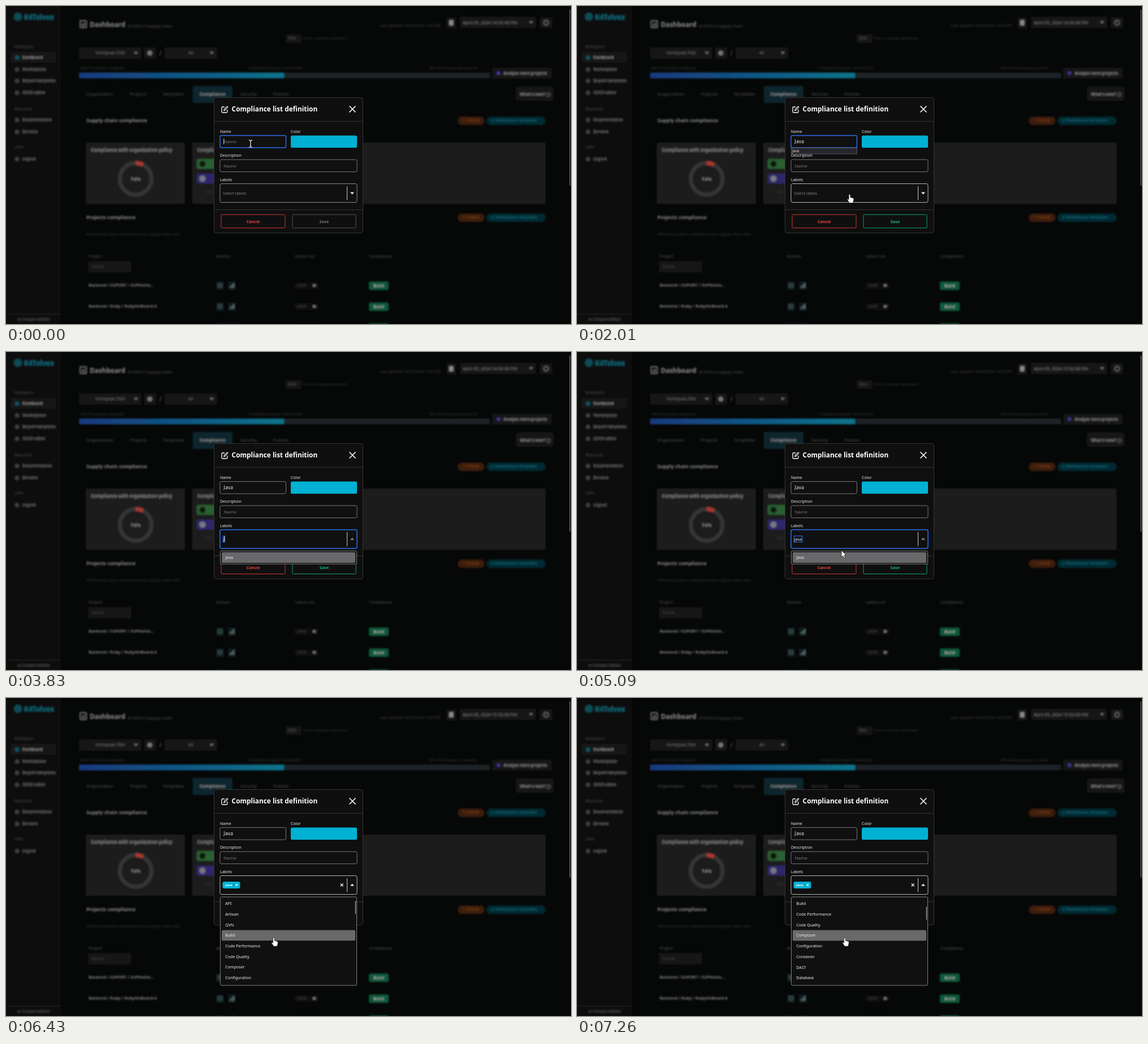
Recreate the animation shown at these times as an HTML page. Size 998 by 561 pixels, loop 8000 ms.

```html
<!DOCTYPE html>
<html lang="en">
<head>
<meta charset="utf-8">
<title>Compliance list definition</title>
<style>
  html, body { margin: 0; width: 100%; height: 100%; overflow: hidden; background: #060707; }
  svg { display: block; width: 100vw; height: 100vh; }
  text { font-family: "Noto Sans", sans-serif; white-space: pre; }
</style>
</head>
<body>
<svg id="stage" viewBox="0 0 998 561"></svg>
<script>
const LOOP = 8000, ROW = 18.7, BLUE = '#2f6fea', GREY = '#77777a';
const stage = document.getElementById('stage');

// ---- markup helpers ----
const box = (x, y, w, h, fill, r = 0, extra = '') =>
  `<rect x="${x}" y="${y}" width="${w}" height="${h}" rx="${r}" fill="${fill}" ${extra}/>`;
const frame = (x, y, w, h, stroke, r = 2.5, extra = '') =>
  box(x, y, w, h, 'none', r, `stroke="${stroke}" ${extra}`);
const label = (x, mid, str, size, fill, weight = 400, extra = '') =>
  `<text x="${x}" y="${(mid + size * 0.36).toFixed(2)}" font-size="${size}" fill="${fill}" font-weight="${weight}" ${extra}>${str}</text>`;
const center = 'text-anchor="middle"';
const line = (d, stroke, w = 1, extra = '') =>
  `<path d="${d}" fill="none" stroke="${stroke}" stroke-width="${w}" ${extra}/>`;

// ---- blurred page behind the dialog ----
function sidebar() {
  const item = (y, str, on) =>
    box(16, y - 3.5, 7, 7, on ? '#0a5360' : '#3c3c3c', 2) + label(29, y, str, 6.6, on ? '#8a8a8a' : '#6c6c6c', 600);
  const head = (y, str) => label(15, y, str, 6.5, '#474747');
  return box(0, 0, 97, 561, '#0a0a0a') +
    '<circle cx="21" cy="19" r="7" fill="#0b4b57"/>' +
    label(32, 20, 'K4Tolvex', 12, '#0a6c7e', 700) +
    head(72, 'Workspace') + box(8, 81, 80, 19, '#191919', 2) + item(91, 'Dashboard', true) +
    item(112, 'Marketplace') + item(132, 'Import templates') + item(153, 'CI/CD editor') +
    head(182, 'Resources') + item(201, 'Documentation') + item(222, 'Zorvane') +
    head(249, 'Links') + item(270, 'Logout') +
    box(0, 543, 97, 1, '#222') + label(20, 553, '≪ Collapse sidebar', 6.4, '#666');
}

function header() {
  const select = (x, y, w, str) => box(x, y, w, 20, '#181818', 3) +
    label(x + w / 2, y + 10, str, 6.8, '#707070', 500, center) +
    `<path d="M${x + w - 13} ${y + 8}h7l-3.5 4z" fill="#707070"/>`;
  const tabs = [[142, 'Organization'], [219, 'Projects'], [277, 'Templates'], [414, 'Security'], [472, 'Policies']];
  return frame(131, 26, 11, 12, '#777', 1, 'stroke-width="2"') + box(134, 31, 2, 5, '#777') + box(137, 29, 2, 7, '#777') +
    label(148, 33, 'Dashboard', 11.6, '#929292', 700) + label(215, 35, 'of K4TLX Supply chain', 7.6, '#505050') +
    label(660, 35, 'Last updated: 04/05/2024 14:50 PM', 6.5, '#3c3c3c') +
    box(778, 20, 17, 20, '#181818', 3) + box(783, 25, 7, 9, '#8a8a8a', 1) +
    box(802, 19, 134, 20, '#181818', 3) +
    '<text id="date" x="807" y="32" font-size="7.7" fill="#7c7c7c"></text><path d="M924 27h7l-3.5 4z" fill="#707070"/>' +
    box(943, 20, 22, 19, '#181818', 3) + '<circle cx="954" cy="29.500" r="4" fill="none" stroke="#777" stroke-width="1.500"/>' +
    box(494, 50, 28, 15, '#151515', 3) + label(499, 57, 'Beta', 6.2, '#555') + label(525, 57, 'This is a preview dashboard', 6, '#3d3d3d') +
    select(129, 73, 110, 'Northpeak-7000') + box(244, 73, 21, 20, '#181818', 3) +
    '<circle cx="254" cy="83" r="4" fill="#777"/>' + label(271, 83, '/', 10, '#777') + select(280, 73, 93, 'All') +
    label(131, 110, '300/716 projects analyzed', 6.4, '#343434') + label(427, 110, 'Completed analysis: 03/04/2024', 6.4, '#343434') +
    label(747, 110, '50% of all resources covered', 6.4, '#343434') +
    box(129, 117.5, 726, 10, '#1a2127', 2) + box(129, 117.5, 362, 10, 'url(#bar)', 2) +
    box(859, 109, 105, 19, '#191919', 3) + '<circle cx="870" cy="118.500" r="3" fill="#45369a"/>' +
    label(879, 118.5, 'Analyze more projects', 6.9, '#868686', 600) +
    tabs.map(([x, s]) => label(x, 155, s, 7.8, '#555')).join('') +
    box(330, 141, 70, 30, '#0a262d', 2) + label(342, 155, 'Compliance', 7.8, '#909090', 700) +
    box(902, 143, 64, 23, '#151515', 3) + frame(902, 143, 64, 23, '#242424', 3) + label(908, 155, "What's new? ⓘ", 7.1, '#8a8a8a', 600);
}

function section(y, str) {
  return label(142, y, str, 8.7, '#8c8c8c', 700) +
    box(798, y - 7, 47, 15, '#3a1c09', 7) + label(806, y, '⚐ Critical', 6.8, '#9a4d1c') +
    box(849, y - 7, 104, 15, '#062a32', 7) + label(856, y, '◎ Marketplace templates', 6.9, '#0b7487');
}

function cards() {
  return box(141, 241, 175, 108, '#1b1b1b', 2) + label(150, 254, 'Compliance with organization policy', 7.9, '#858585', 600) +
    '<circle cx="229" cy="305" r="28" fill="none" stroke="#343434" stroke-width="7"/>' +
    line('M229 277A28 28 0 0 1 242 280.200', '#a5382f', 7) + label(229, 305, '7.6%', 7.2, '#999', 600, center) +
    box(329, 241, 624, 108, '#1b1b1b', 2) + label(338, 254, 'Compliance lists', 7.9, '#858585', 600) +
    box(337, 270, 60, 17, '#2a6030', 3) + '<circle cx="347" cy="278.500" r="5.500" fill="#0b140c"/>' +
    box(337, 296, 60, 17, '#2d276c', 3) + '<circle cx="347" cy="304.500" r="5.500" fill="#77777f"/>' +
    label(347, 328, '+ Add', 6.5, '#333');
}

function tableRow(y, name) {
  return label(146, y - 1, name, 7.3, '#858585', 600) +
    box(371, y - 7, 14, 15, '#0d1c1f', 2) + frame(375, y - 3, 6, 6, '#66777a', 1) +
    box(392, y - 7, 14, 15, '#0d1c1f', 2) + line(`M396 ${y + 4}v-2M399 ${y + 4}v-5M402 ${y + 4}v-8`, '#66777a', 1.8) +
    box(508, y - 6, 45, 13, '#101010', 6) + label(513, y, 'Latest', 6.3, '#444') + box(542, y - 2, 5, 4, '#777', 1) +
    box(641, y - 7, 35, 15, '#08583b', 3) + label(658.5, y, 'Build', 7.2, '#a3aaa7', 700, center);
}

function table() {
  const heads = [[146, 'Project'], [371, 'Actions'], [510, 'Latest run'], [642, 'Compliance']];
  return label(142, 402, 'Affected project compliance by supply chain lists', 7.3, '#343434') +
    heads.map(([x, s]) => label(x, 441, s, 7.3, '#555')).join('') +
    box(145, 450, 76, 20, '#181818', 2) + label(151, 460, 'Search...', 6.5, '#444') +
    tableRow(493, 'Backend / SUPORT / SUPNotto...') + tableRow(530, 'Backend / Ruby / RubyOnBoard-6') +
    tableRow(567, 'Backend / Tools / Builder');
}

// ---- dialog ----
function dialog() {
  return box(367.5, 161.5, 263, 239, '#0f0f0f', 4, 'stroke="#343434"') +
    line('M368 203.500H630M368 359.500H630', '#333') +
    line('M386 178H382.500Q381 178 381 179.500V186.500Q381 188 382.500 188H389.500Q391 188 391 186.500V183', '#fff', 1.3) +
    line('M385 184.500L385.600 182 390 177.400Q391.400 176.800 391.800 178.400L387.400 183.500Z', '#fff', 1.1) +
    label(398.6, 182, 'Compliance list definition', 11.85, '#fff', 700) +
    line('M606.500 176.500L617.500 187.500M617.500 176.500L606.500 187.500', '#fff', 1.6) +
    label(378, 221, 'Name', 7.02, '#eee', 500) + label(503, 221, 'Color', 7.02, '#eee', 500) +
    label(378, 263.7, 'Description', 7.02, '#eee', 500) + label(378, 306.2, 'Labels', 7.02, '#eee', 500) +
    box(378, 228.5, 116.5, 21.5, '#101010', 2.5, `id="nameBox" stroke="${BLUE}"`) +
    box(503, 228.5, 117, 21.5, '#00b1d4', 2.5) +
    box(378, 271, 242, 21.5, '#101010', 2.5, `stroke="${GREY}"`) + label(384.6, 282, 'Name', 7.9, '#77777c') +
    label(384.6, 239, 'Name', 7.9, '#77777c', 400, 'id="nameHint"') +
    label(384.6, 239, '', 8.6, '#f2f2f2', 400, 'id="nameText"') +
    box(384, 234, 1, 10, '#ddd', 0, 'id="nameCaret"') +
    `<g id="suggest">${box(378.5, 250.5, 116, 10.5, '#26262d', 0, 'stroke="#55555c"')}${label(380, 256, 'Java', 6.6, '#ddd')}</g>` +
    box(378, 313.5, 242, 33, '#101010', 3, 'id="labelBox"') +
    label(383.3, 330, 'Select labels', 7.1, '#808085', 400, 'id="labelHint"') +
    box(383.3, 324.5, 3, 11, 'none', 0, `id="ring" stroke="${BLUE}"`) +
    label(383.9, 330, '', 7.02, '#f2f2f2', 400, 'id="labelText"') +
    box(383.3, 325, 1, 9, '#ddd', 0, 'id="labelCaret"') +
    `<g id="chip">${box(382.5, 324, 31, 12, '#00b1d4', 3)}${label(387, 330.2, 'Java', 6, '#fff', 600)}
      ${line('M405.700 328.200l3.400 3.400m0-3.400l-3.400 3.400', '#fff', 1.1)}
      ${line('M590.800 327.500l4.800 4.800m0-4.800l-4.800 4.800', '#eee', 1.4)}</g>` +
    line('M602.500 318V342.500', '#ccc') + '<path id="tri"/>' +
    frame(380, 368, 113, 23.5, '#c93535', 1.5) + label(436.5, 380, 'Cancel', 7.1, '#ef4444', 700, center) +
    frame(506, 368, 112, 23.5, '#555', 1.5, 'id="saveBox"') + label(562, 380, 'Save', 7.1, '#777', 700, center + ' id="saveText"');
}

const items = ['API', 'Artisan', 'QVN', 'Build', 'Code Performance', 'Code Quality', 'Composer', 'Configuration', 'Container', 'DAST', 'Database'];
const option = (str, i, size = 7.07) => label(387.3, 362.7 + i * ROW, str, size, '#f0f0f0', 500);
const menus = `
  <g id="full">${box(378.5, 351, 241, 156, '#101010', 2, 'stroke="#808083"')}
    <g clip-path="url(#menuClip)"><g id="list">${box(381, 353.3, 236, ROW, '#69696c', 2, 'id="hover"')}${items.map((s, i) => option(s, i)).join('')}</g></g>
    ${box(616.8, 358, 1.2, 23, '#aaa', 0, 'id="thumb"')}</g>
  <g id="short">${box(378.5, 351, 241, 23, '#101010', 2, 'stroke="#808083"')}${box(381, 353.3, 236, ROW, '#69696c', 2)}${option('Java', 0, 7.3)}</g>`;

const cursors = `
  <g id="hand"><path d="M-1.400 1.200a1.400 1.400 0 0 1 2.800 0V5l4.600 1.200q1.600.4 1.400 2L6.800 11.500 6 15H-.2L-3.800 9.600q-.6-1.200.5-1.600.8-.2 1.900 1.200z" fill="#fff" stroke="#111" stroke-width=".7"/></g>
  <g id="arrow"><path d="M0 0V12L2.800 9.400 4.700 13.600 6.700 12.700 4.900 8.600H8.600Z" fill="#fff" stroke="#111" stroke-width=".7"/></g>
  <g id="beam">${line('M-3-6.300Q0-6.300 0-4.500V4.500Q0 6.300-3 6.300M3-6.300Q0-6.300 0-4.500M0 4.500Q0 6.300 3 6.300', '#111', 2.4)}${line('M-3-6.300Q0-6.300 0-4.500V4.500Q0 6.300-3 6.300M3-6.300Q0-6.300 0-4.500M0 4.500Q0 6.300 3 6.300', '#fff', 1.2)}</g>`;

stage.innerHTML = `<defs>
    <linearGradient id="bar"><stop stop-color="#173a80"/><stop offset="1" stop-color="#06748a"/></linearGradient>
    <filter id="soft" x="0" y="0" width="998" height="561" filterUnits="userSpaceOnUse"><feGaussianBlur stdDeviation="1.35"/></filter>
    <clipPath id="menuClip">${box(379, 352, 240, 154.7, '#000')}</clipPath>
  </defs>` + box(0, 0, 998, 561, '#060707') +
  `<g filter="url(#soft)">${sidebar()}${header()}${section(202, 'Supply chain compliance')}${cards()}${section(373, 'Projects compliance')}${table()}</g>` +
  box(995.3, 6, 1.4, 311, '#66686a', .7) + dialog() + menus + cursors;

const el = {};
stage.querySelectorAll('[id]').forEach(n => el[n.id] = n);
const show = (n, on) => n.style.display = on ? '' : 'none';
const set = (n, attrs) => { for (const k in attrs) n.setAttribute(k, attrs[k]); };

// ---- timeline: each key holds until the next ----
const held = (keys, t) => { let k = keys[0]; for (const c of keys) if (t >= c[0]) k = c; return k; };
const nameKeys = [[0, 0], [740, 1], [1100, 2], [1280, 3], [1470, 4]];
const tagKeys = [[0, 0], [3650, 1], [3920, 2], [4100, 3], [4280, 4], [5620, 0]];
const scrollKeys = [[0, 0], [6990, 26.4], [7080, 45], [7170, 53.5], [7260, 56]];
const hoverKeys = [[0, 0], [6340, 2], [6430, 3], [7260, 6]];
const mouseKeys = [
  [0, 'beam', 432, 243], [740, ''], [1650, 'arrow', 450, 264], [1740, 'arrow', 468, 298], [1830, 'hand', 481.5, 332.5],
  [3650, ''], [4550, 'hand', 476, 336], [4730, 'hand', 473, 340], [4910, 'hand', 470, 345], [5000, 'arrow', 467, 350],
  [5180, 'arrow', 470, 355], [5350, 'hand', 475, 361], [6160, 'hand', 475.5, 363], [6250, 'hand', 475.5, 365.5],
  [6340, 'hand', 474, 400], [6430, 'hand', 473, 423]
];

function draw(t) {
  const name = 'Java'.slice(0, held(nameKeys, t)[1]);
  const tag = 'java'.slice(0, held(tagKeys, t)[1]);
  const open = t >= 2190, focus = open && t < 5620, chosen = t >= 5620;

  el.date.textContent = `April 05, 2024 ${t < 4400 ? '14:50:48' : '15:52:08'} PM`;

  el.nameText.textContent = name;
  show(el.nameHint, !name);
  show(el.suggest, t >= 920 && !open);
  set(el.nameBox, { stroke: open ? GREY : BLUE, 'stroke-width': open ? 1 : 1.4 });
  show(el.nameCaret, t < 370 || (t >= 740 && t < 2010));
  set(el.nameCaret, { x: 384.3 + (name ? el.nameText.getComputedTextLength() + .3 : 0) });

  const save = name ? '#10b981' : '#77777a';
  set(el.saveText, { fill: save });
  set(el.saveBox, { stroke: name ? '#0f9f70' : '#555' });

  el.labelText.textContent = tag;
  const width = tag ? el.labelText.getComputedTextLength() : 0;
  show(el.labelHint, !tag && !chosen);
  show(el.ring, focus);
  set(el.ring, { width: width + 1.6 });
  show(el.labelCaret, focus && !(t >= 2640 && t < 3100) && t < 4800);
  set(el.labelCaret, { x: 383.3 + width });
  show(el.chip, chosen);
  const edge = focus ? BLUE : t >= 1830 ? '#b5b5b7' : '#8a8a8c';
  set(el.labelBox, { stroke: edge, 'stroke-width': focus ? 1.5 : 1 });
  set(el.tri, { d: open ? 'M608 331.500h7l-3.500-4z' : 'M608 328.500h7l-3.500 4z', fill: focus ? '#858588' : '#eee' });

  const scroll = held(scrollKeys, t)[1];
  show(el.short, tag);
  show(el.full, open && !tag);
  set(el.list, { transform: `translate(0 ${-scroll})` });
  set(el.hover, { y: 353.3 + held(hoverKeys, t)[1] * ROW });
  set(el.thumb, { y: 358 + scroll * .18 });

  const [, kind, x, y] = held(mouseKeys, t);
  for (const k of ['hand', 'arrow', 'beam']) show(el[k], k === kind);
  if (kind) set(el[kind], { transform: `translate(${x} ${y})` });
}

const start = performance.now();
function tick() {
  draw((performance.now() - start) % LOOP);
  requestAnimationFrame(tick);
}
tick();
</script>
</body>
</html>
```
